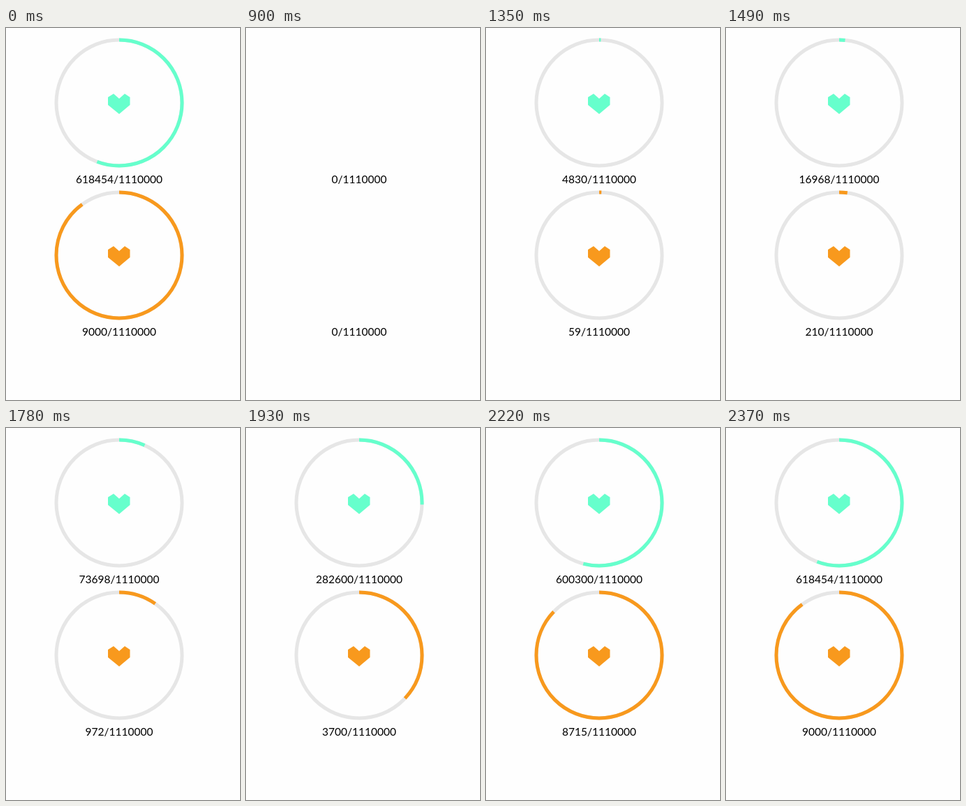
Write an HTML page that moves like this. It is 335 px wide and 532 px high and loops after 5.02 s.

```html
<!DOCTYPE html>
<html lang="en">
<head>
<meta charset="utf-8">
<title>Progress rings</title>
<style>
  html, body { margin: 0; width: 100%; height: 100%; overflow: hidden; background: #fefefe; }
  svg { display: block; width: 335px; height: 532px; }
  circle { fill: none; stroke-width: 5; }
  .track { stroke: #e6e6e6; }
  text { font: 15.5px Lato, "Open Sans", sans-serif; text-anchor: middle; fill: #000; }
</style>
</head>
<body>
<svg id="stage" viewBox="0 0 335 532"></svg>
<script>
const LOOP = 5020;
const GOAL = 1110000;
const HEART = "-16,-8 -8,-13 0,-6 8,-13 15.5,-8 15.5,3 0,16 -16,3";

// [start in ms, upper count, lower count]; null hides the rings
const STEPS = [
  [0, 618454, 9000],
  [900, null, null],
  [1200, 0, 0],
  [1350, 4830, 59],
  [1490, 16968, 210],
  [1640, 38000, 508],
  [1780, 73698, 972],
  [1930, 282600, 3700],
  [2070, 564151, 8122],
  [2220, 600300, 8715],
  [2370, 618454, 9000]
];

const stage = document.getElementById("stage");

function add(parent, tag, attrs) {
  const node = document.createElementNS("http://www.w3.org/2000/svg", tag);
  for (const [key, value] of Object.entries(attrs)) node.setAttribute(key, value);
  return parent.appendChild(node);
}

function makeMeter(y, color, full) {
  const group = add(stage, "g", { transform: `translate(162 ${y})` });
  const dial = add(group, "g", {});
  add(dial, "circle", { r: 90, class: "track" });
  const arc = add(dial, "circle", { r: 90, stroke: color, pathLength: 1, transform: "rotate(-90)" });
  add(dial, "polygon", { points: HEART, fill: color });
  const label = add(group, "text", { y: 115 });

  return count => {
    dial.style.display = count === null ? "none" : "";
    arc.style.display = count ? "" : "none";
    arc.setAttribute("stroke-dasharray", `${(count || 0) / full} 2`);
    label.textContent = `${count || 0}/${GOAL}`;
  };
}

const meters = [
  makeMeter(107, "#66ffcc", GOAL),
  makeMeter(325, "#f8991d", 10000)
];

let shown = null;
const begin = performance.now();

function draw(now) {
  const time = Math.max(0, now - begin) % LOOP;
  const step = STEPS.findLast(([start]) => start <= time);
  if (step !== shown) {
    meters.forEach((show, i) => show(step[i + 1]));
    shown = step;
  }
  requestAnimationFrame(draw);
}
draw(begin);
</script>
</body>
</html>
```
